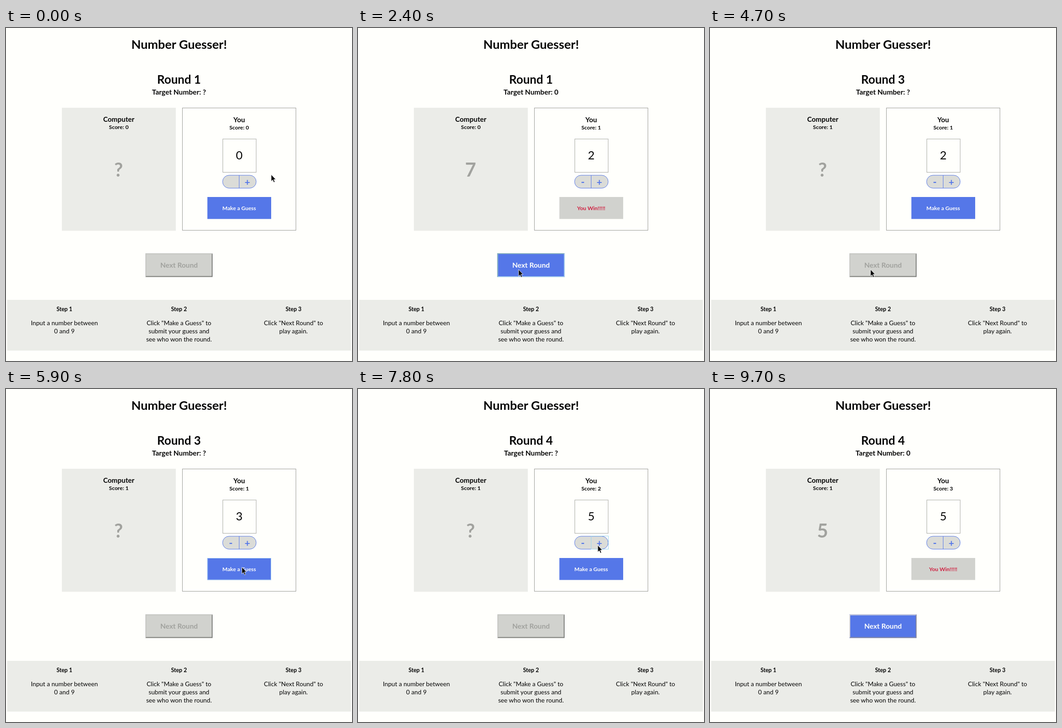
An HTML page for the animation above (9.8 s loop, 762 by 735 pixels).

```html
<!DOCTYPE html>
<html lang="en">
<head>
<meta charset="utf-8">
<title>Number Guesser!</title>
<style>
  html, body { margin: 0; width: 100%; height: 100%; overflow: hidden; background: #fffffc; }
  svg { display: block; width: 762px; height: 735px; font-family: Lato, sans-serif; }
  text { text-anchor: middle; fill: #060606; white-space: pre; }
  .b { font-weight: 700; }
  .panel { fill: #ebece8; }
  .blue { fill: #5577e8; }
  .off { fill: #d1d2ce; }
  .muted { fill: #a1a29e; }
  .red { fill: #cf2040; }
  .white { fill: #fffffc; }
  .line { fill: none; }
</style>
</head>
<body>
<svg viewBox="0 0 762 735">
  <rect width="762" height="735" fill="#fffffc"/>
  <text class="b" x="381.3" y="45.5" font-size="27.2">Number Guesser!</text>
  <text class="b" id="round" x="381" y="122.5" font-size="26"></text>
  <text class="b" id="target" x="381" y="146.5" font-size="15.6"></text>

  <rect class="panel" x="123" y="176" width="251" height="271.5"/>
  <text class="b" x="248.4" y="207" font-size="15.4">Computer</text>
  <text class="b" id="cpuScore" x="248.4" y="223.3" font-size="12.1"></text>
  <text class="b muted" id="cpu" x="248" y="328" font-size="42"></text>
  <text class="b red" id="cpuWin" x="248.3" y="410.5" font-size="13.5">Computer Wins!!!</text>

  <rect class="line" x="388.5" y="176.5" width="250" height="270" stroke="#999a96"/>
  <text class="b" x="513.5" y="207.5" font-size="15.2">You</text>
  <text class="b" id="myScore" x="513.5" y="224" font-size="12.1"></text>
  <rect class="line" x="477.5" y="245" width="73.5" height="73.5" stroke="#a6a7a3"/>
  <text id="value" x="513.7" y="290" font-size="25.5"></text>

  <rect x="477" y="325" width="74" height="28.5" rx="14.2" fill="#dbdcd8" stroke="#5577e8"/>
  <path d="M513.5 325v28.5" stroke="#5577e8"/>
  <text class="b blue" id="minus" x="495" y="348" font-size="22">-</text>
  <text class="b blue" x="531.7" y="348" font-size="21">+</text>
  <rect class="line" id="plusRing" x="513.5" y="324.5" width="38" height="29" stroke="#9ed6ee"/>

  <rect id="guess" x="443.5" y="373" width="140.5" height="48.5"/>
  <rect class="line" id="guessRing" x="444" y="373.5" width="139.5" height="47.5" stroke="#9cc8f2"/>
  <text class="b" id="guessText" x="513.6" y="401.5" font-size="12"></text>

  <g transform="translate(307 497.5)">
    <rect id="next" width="148" height="52"/>
    <g id="bevel">
      <path id="light" d="M0 52V0H148L146 2H2V50Z"/>
      <path id="dark" d="M0 52H148V0L146 2V50H2Z"/>
    </g>
    <g class="line" id="nextRing">
      <rect x=".5" y=".5" width="147" height="51" stroke="#a9cfee" stroke-width="2"/>
      <path d="M.5 51.5V.5H147" stroke="#7fa8b0" stroke-width="1.5"/>
    </g>
  </g>
  <text class="b" id="nextText" x="381" y="529" font-size="15.6">Next Round</text>

  <rect class="panel" x="2.5" y="600" width="757" height="112"/>
  <g id="steps"></g>
  <path id="cursor" d="M0 0V15L3.4 11.8 5.7 17.2 8.2 16.2 5.9 10.8H10.2Z" fill="#0c0c0c" stroke="#fff" stroke-width=".8"/>
</svg>
<script>
const LOOP = 9800, TICK = 100, GLIDE = 400;
const $ = id => document.getElementById(id);

const steps = [
  ["Input a number between", "0 and 9"],
  ["Click \"Make a Guess\" to", "submit your guess and", "see who won the round."],
  ["Click \"Next Round\" to", "play again."]
];

function addText(x, y, size, str, style = "") {
  const el = document.createElementNS("http://www.w3.org/2000/svg", "text");
  const attrs = { x, y, "font-size": size, class: style };
  for (const key in attrs) el.setAttribute(key, attrs[key]);
  el.textContent = str;
  $("steps").append(el);
}
steps.forEach((lines, i) => {
  const x = 128.6 + i * 252.3;
  addText(x, 625.3, 12.4, "Step " + (i + 1), "b");
  lines.forEach((s, n) => addText(x, 656 + n * 18.2, 13.7, s));
});

const spots = {
  start: [584, 323.5], aside: [540, 356], lift: [523, 382], leave: [326, 291], exit: [57, 10],
  guess: [519.5, 393], plus: [528, 345], next: [353.5, 533]
};

// The pointer's visits; those marked "!" press the button there.
const visits = [
  [0, "start"], [400, "guess!"], [1000, "aside"], [1400, "plus!"], [1600, "plus!"], [2400, "next!"],
  [3500, "guess!"], [3800, "lift"], [4400, "next!"], [5300, "plus!"], [5900, "guess!"], [6500, "next!"],
  [7000, "guess"], [7400, "plus!"], [7600, "plus!"], [8200, "guess!"], [9000, "leave"], [9600, "exit"]
].map(([time, name]) => ({ time, spot: name.replace("!", ""), press: name.endsWith("!") }));

const cpuPicks = [7, 0, 8, 5];

// What each button does once it is released.
const actions = {
  plus: s => { s.value++; },
  guess: s => {
    s.target = 0;
    s.cpu = cpuPicks[s.round - 1];
    s.winner = Math.abs(s.value - s.target) <= Math.abs(s.cpu - s.target) ? "me" : "cpu";
    s[s.winner + "Score"]++;
    s.focus = "";
  },
  next: s => Object.assign(s, { round: s.round + 1, target: "?", cpu: "?", winner: "", focus: "" })
};

function game(t) {
  const s = { round: 1, target: "?", cpu: "?", value: 0, cpuScore: 0, meScore: 0, winner: "", focus: "" };
  for (const { time, spot, press } of visits) {
    if (!press || time > t) continue;
    s.focus = spot;
    if (time + TICK <= t) actions[spot](s);
  }
  return s;
}

// Rest at each spot, then glide so as to arrive on time.
function pointer(t) {
  const i = visits.findIndex(v => v.time > t);
  if (i < 0) return spots.exit;
  const from = visits[i - 1], to = visits[i];
  const span = Math.min(GLIDE, to.time - from.time);
  const u = Math.max(0, 1 - (to.time - t) / span), k = u * u * (3 - 2 * u);
  const [x, y] = spots[from.spot], [x1, y1] = spots[to.spot];
  return [x + (x1 - x) * k, y + (y1 - y) * k];
}

const show = (id, on) => { $(id).style.display = on ? "" : "none"; };
const write = (id, s) => { $(id).textContent = s; };
const style = (id, names) => $(id).setAttribute("class", names);

function draw(t) {
  const s = game(t), done = s.winner !== "", won = s.winner === "me";
  write("round", "Round " + s.round);
  write("target", "Target Number: " + s.target);
  write("cpuScore", "Score: " + s.cpuScore);
  write("myScore", "Score: " + s.meScore);
  write("cpu", s.cpu);
  write("value", s.value);
  show("minus", s.value > 0);
  show("cpuWin", s.winner === "cpu");
  for (const id of ["plus", "guess", "next"]) show(id + "Ring", s.focus === id);

  write("guessText", won ? "You Win!!!!!" : "Make a Guess");
  style("guessText", "b " + (won ? "red" : done ? "muted" : "white"));
  style("guess", done ? "off" : "blue");

  style("next", done ? "blue" : "off");
  style("nextText", "b " + (done ? "white" : "muted"));
  $("light").setAttribute("fill", done ? "#cfd0d8" : "#c4c5c1");
  $("dark").setAttribute("fill", done ? "#8486a0" : "#7f807d");
  show("bevel", s.focus !== "next");

  show("cursor", t <= visits[visits.length - 1].time);
  $("cursor").setAttribute("transform", `translate(${pointer(t)})`);
}

const began = performance.now();
let last = -1;
function tick() {
  const t = Math.floor((performance.now() - began) % LOOP / TICK) * TICK;
  if (t !== last) draw(last = t);
  requestAnimationFrame(tick);
}
tick();
</script>
</body>
</html>
```
